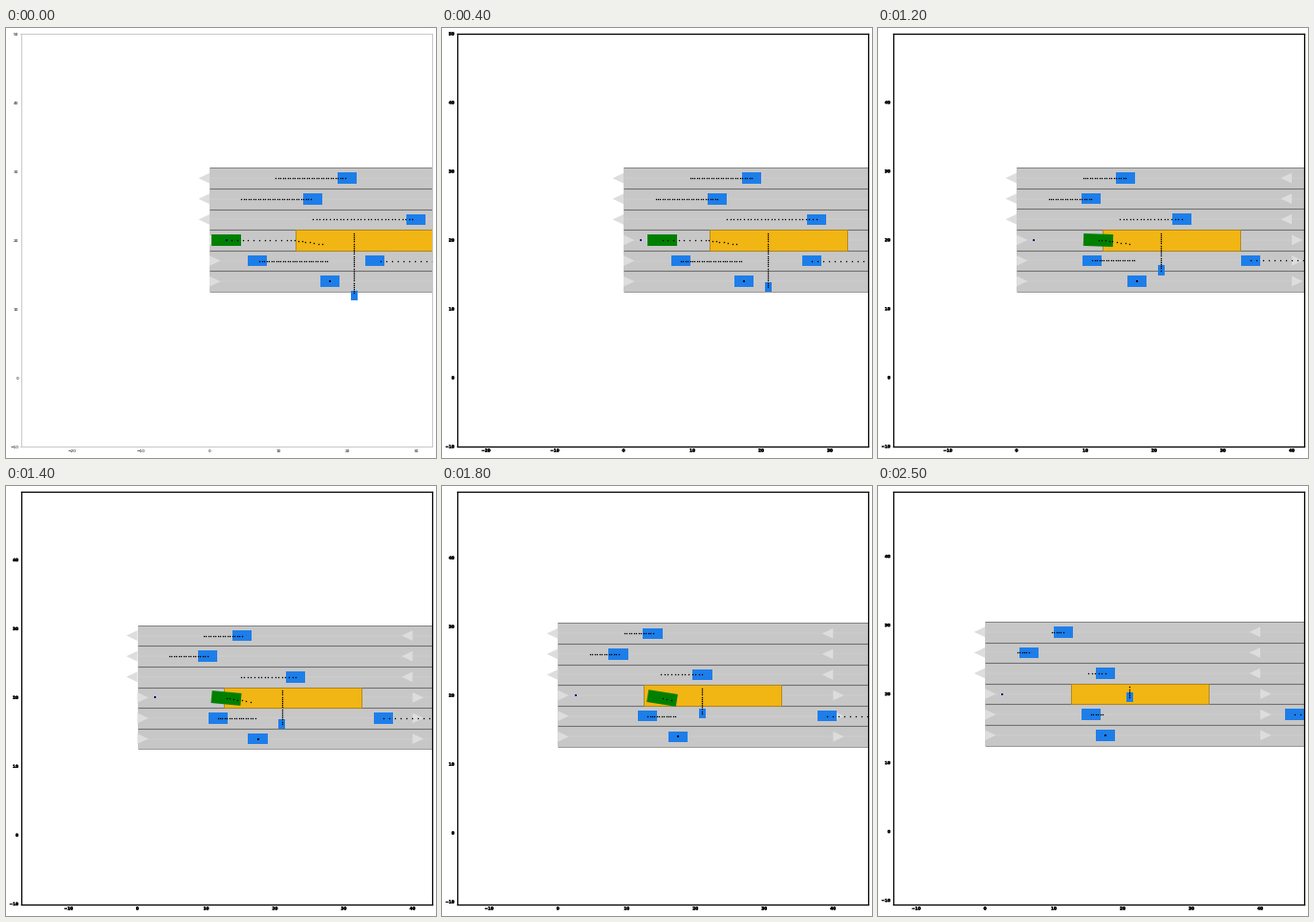
Recreate the animation shown at these times as a matplotlib script. Size 450 by 450 pixels, loop 2.6 s.

```python
import numpy as np
import matplotlib.pyplot as plt
from matplotlib.animation import FuncAnimation
from matplotlib.patches import Polygon, Rectangle
from matplotlib.patheffects import withStroke

SIZE, DPI = 450, 100
FRAMES, HORIZON, EGO_END = 26, 30, 20
LEFT, RIGHT, TOP, BOTTOM = 15.5, 445.5, 6, 438
PX_PER_M = 7.2
PX = 72 / DPI  # one pixel in points

LANE_WIDTH = 3
LANE_CENTERS = 14 + LANE_WIDTH * np.arange(6)
SEGMENT = 40
START = (2.55, 20)

# start x, start y, vx, vy per frame, length, width
CAR = (2.8, 1.6)
OBSTACLES = [
    (20, 29, -0.345, 0, *CAR),
    (15, 26, -0.345, 0, *CAR),
    (30, 23, -0.5, 0, *CAR),
    (6.95, 17, 0.338, 0, *CAR),
    (24, 17, 0.84, 0, *CAR),
    (17.5, 14, 0, 0, *CAR),
    (21, 12, 0, 0.3, 1.0, 1.4),
]

steps = np.arange(EGO_END + 1)
ego_x = np.interp(steps, [0, 11, 12, 13, 16, 18, 20],
                  [2.43, 11.2, 11.87, 12.4, 13.95, 15.17, 16.45])
ego_angle = np.radians(np.interp(steps, [10, 12, 16, 20], [0, -2, -8.5, -9.5]))
slope = np.tan((ego_angle[1:] + ego_angle[:-1]) / 2)
ego_y = 20 + np.r_[0, np.cumsum(slope * np.diff(ego_x))]

fig = plt.figure(figsize=(SIZE / DPI, SIZE / DPI), dpi=DPI, facecolor="white")
ax = fig.add_axes([LEFT / SIZE, 1 - BOTTOM / SIZE,
                   (RIGHT - LEFT) / SIZE, (BOTTOM - TOP) / SIZE])


def box(x, y, length, width, color, z, angle=0.0):
    corners = np.array([[-1, -1], [1, -1], [1, 1], [-1, 1]]) * [length / 2, width / 2]
    c, s = np.cos(angle), np.sin(angle)
    corners = corners @ np.array([[c, s], [-s, c]]) + [x, y]
    ax.add_patch(Polygon(corners, fc=color, ec="none", zorder=z))


def dots(x, y, size=1.3, color="black", z=8):
    ax.plot(x, y, "s", ms=size * PX, mew=0, color=color, zorder=z)


def draw_road():
    end = 2 * SEGMENT
    bottom = LANE_CENTERS[0] - LANE_WIDTH / 2
    ax.add_patch(Rectangle((0, bottom), end, 6 * LANE_WIDTH,
                           fc="#c7c7c7", ec="none", zorder=1))
    for i in range(7):
        inner = 0 < i < 6
        ax.plot([0, end], [bottom + i * LANE_WIDTH] * 2, color="#555555",
                lw=(1.1 if inner else 0.8) * PX, alpha=0.75, zorder=2,
                solid_capstyle="butt")
    for i, y in enumerate(LANE_CENTERS):
        ax.plot([0, end], [y, y], color="#dddddd", lw=0.4 * PX, alpha=0.7, zorder=2)
        direction = 1 if i < 3 else -1
        for x in (0, SEGMENT, end):
            ax.add_patch(Polygon([(x, y - 0.75), (x, y + 0.75), (x + 1.6 * direction, y)],
                                 fc="#dddddd", ec="none", zorder=3))


def draw_axes(frame, x, y):
    half_w = (RIGHT - LEFT) / PX_PER_M / 2
    half_h = (BOTTOM - TOP) / PX_PER_M / 2
    ax.set_xticks(np.arange(-30, 60, 10))
    ax.set_yticks(np.arange(-10, 60, 10))
    ax.set_xlim(x - half_w, x + half_w)
    ax.set_ylim(y - half_h, y + half_h)
    ax.tick_params(length=0, pad=1.8, labelsize=4.2 * PX, labelcolor="black")
    first = frame == 0
    for label in ax.get_xticklabels() + ax.get_yticklabels():
        label.set_text(label.get_text().replace("\u2212", "-"))
        label.set_fontfamily("DejaVu Sans")
        if not first:
            label.set_fontweight("bold")
            label.set_path_effects([withStroke(linewidth=0.5 * PX, foreground="black")])
    for spine in ax.spines.values():
        spine.set_color("#c4c4c4" if first else "black")
        spine.set_linewidth((0.9 if first else 1.3) * PX)
        spine.set_zorder(20)


def draw(frame):
    ax.clear()
    now = min(frame, EGO_END)
    draw_road()
    ax.add_patch(Rectangle((12.5, 18.5), 20, LANE_WIDTH, fc="#f1b514",
                           ec="#b0851a", lw=0.9 * PX, zorder=4))

    future = np.arange(max(frame, 1), HORIZON + 1)
    for x, y, vx, vy, length, width in OBSTACLES:
        box(x + vx * frame, y + vy * frame, length, width, "#1d7eea", 6)
        if vx or vy:
            dots(x + vx * future, y + vy * future)
        else:
            dots([x], [y], 2)

    if frame <= EGO_END:
        box(ego_x[now], ego_y[now], 4.3, 1.8, "green", 5, ego_angle[now])
        dots(ego_x[now:], ego_y[now:])
    dots([START[0]], [START[1]], 2, "#00008b", 9)
    draw_axes(frame, ego_x[now], ego_y[now])


anim = FuncAnimation(fig, draw, frames=FRAMES, interval=100,
                     repeat=True, repeat_delay=0)
plt.show()
```
